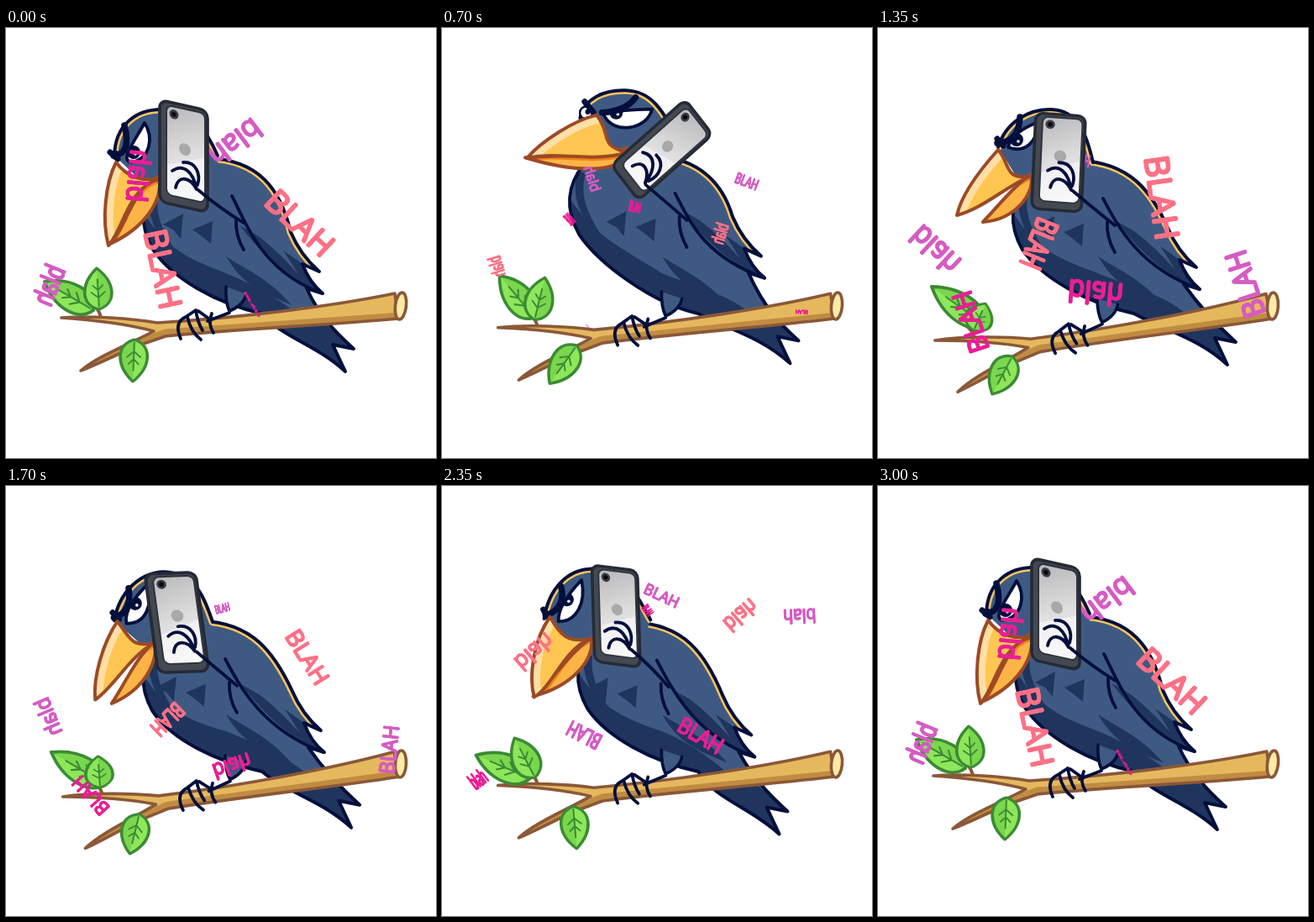
These frames come from a looping animation (512x512 px, 3.05 s). An HTML page with a canvas:

```html
<!DOCTYPE html>
<html lang="en">
<head>
<meta charset="utf-8">
<title>Chatty bird</title>
<style>
html, body { margin: 0; width: 100%; height: 100%; overflow: hidden; background: #fff; }
canvas { display: block; width: 512px; height: 512px; }
</style>
</head>
<body>
<canvas id="stage"></canvas>
<script>
const LOOP = 3050, STEP = 50, CYCLE = 3000;
const TIMES = [0, 450, 950, 1350, 2100, 2650];
const N = TIMES.length;
const INK = '#020f3c', BLUE = '#3f5a82', DARK = '#1f355e', GOLD = '#fdc45c', RUST = '#9c4a26';
const MAGENTA = '#e91f95', ORCHID = '#d65cc3', SALMON = '#fd7186';

const canvas = document.getElementById('stage');
const g = canvas.getContext('2d');
const dpr = window.devicePixelRatio || 1;
canvas.width = canvas.height = 512 * dpr;

// Pose tables: one entry per time, joined by smooth curves.
const keyTime = i => TIMES[(i + N) % N] + CYCLE * Math.floor(i / N);
const NUM = /-?\d+(?:\.\d+)?/g;

function track(...poses) {
  const rows = poses.map(p => p.match(NUM).map(Number));
  const gaps = poses[0].split(NUM);
  const row = i => rows[(i + N) % N];
  const values = t => {
    let i = N - 1;
    while (TIMES[i] > t) i--;
    const t0 = keyTime(i - 1), t1 = keyTime(i), t2 = keyTime(i + 1), t3 = keyTime(i + 2);
    const d = t2 - t1, k = (t - t1) / d;
    return row(i).map((p, j) => {
      const q = row(i + 1)[j];
      const m = (q - row(i - 1)[j]) / (t2 - t0) * d;
      const n = (row(i + 2)[j] - p) / (t3 - t1) * d;
      return p + k * m + k * k * (3 * (q - p) - 2 * m - n) + k * k * k * (2 * (p - q) + m + n);
    });
  };
  const path = t => {
    const v = values(t);
    return gaps.map((s, j) => s + (j < v.length ? v[j].toFixed(2) : '')).join('');
  };
  return { values, path };
}

// Offsets of neck, wing, tail and chest, then the branch drop.
const sway = track('1 -3 -6 5 -12 8 3 0 0', '10 -8 0 -13 -5 0 -10 -22 4', '7 -3 1 -10 1 -2 -5 -10 20',
  '0 0 0 0 0 0 0 0 27', '-13 5 -9 11 -11 12 4 6 19', '-8 2 -11 10 -17 13 -2 -5 2');

const dome = track(
  'M129,152C130,115 155,97 185,97C225,97 240,125 252,152',
  'M168,102C172,80 195,69 220,70C250,71 268,90 290,150',
  'M154,122C160,95 185,83 212,84C240,85 252,100 282,155',
  'M143,142C152,112 180,96 206,97C238,98 248,125 256,160',
  'M117,172C120,135 140,106 172,104C215,105 225,135 242,162',
  'M131,137C140,103 165,90 192,91C230,92 245,125 258,155');

const upperBeak = track(
  'M131,160C118,185 114,230 122,259C140,240 145,190 182,180C160,182 145,178 131,160',
  'M192,99C165,104 125,122 106,138C145,133 175,150 226,146C190,132 210,122 192,99',
  'M165,120C140,132 110,165 98,192C140,180 165,178 206,158C172,155 185,145 165,120',
  'M143,145C125,165 100,195 94,223C125,215 150,190 182,176C150,182 158,162 143,145',
  'M126,170C108,200 108,250 118,276C135,255 145,210 176,192C150,198 140,190 126,170',
  'M134,137C112,160 98,195 99,217C128,215 145,172 180,168C150,172 145,160 134,137');

const lowerBeak = track(
  'M124,257C145,235 150,190 182,176C188,205 165,238 124,257',
  'M106,138C150,136 185,146 226,140C228,170 168,168 106,138',
  'M98,192C140,182 175,172 206,153C208,180 165,196 98,192',
  'M125,231C145,210 160,190 182,174C188,195 165,228 125,231',
  'M119,275C140,245 150,215 176,190C180,218 162,250 119,275',
  'M99,217C125,212 150,180 181,167C186,190 150,222 99,217');

const eye = track(
  'M165,113C176,130 172,155 150,160C135,158 150,140 165,113',
  'M260,98C252,120 210,124 203,97C222,98 240,98 260,98',
  'M223,99C222,125 190,138 172,120C185,108 205,103 223,99',
  'M191,112C190,135 175,150 155,142C158,128 175,118 191,112',
  'M156,116C166,145 160,175 135,178C128,160 145,135 156,116',
  'M182,107C182,128 165,142 147,137C152,122 168,112 182,107');

const pupil = track('152 148', '219 98', '184 113', '165 133', '146 142', '155 128');
const farEye = track('130 149 1', '177 96 8', '158 116 3', '145 138 1', '118 168 1', '133 132 1');
const brow = track('M128,152Q150,150 141,116', 'M205,95Q224,100 243,82', 'M163,117Q200,108 200,90',
  'M142,137Q168,136 169,106', 'M119,170Q140,158 130,132', 'M134,131Q162,126 160,101');
const farBrow = track('M124,148L133,156', 'M174,82L190,94', 'M157,106L161,118',
  'M142,132L149,140', 'M115,162L122,171', 'M131,126L134,134');

// Phone corners: top left, top right, bottom left.
const phone = track('184 87 239 99 184 206', '291 83 324 122 208 156', '263 92 299 126 193 182',
  '189 102 246 106 184 214', '161 105 216 104 182 220', '205 82 255 99 184 193');
const wrist = track('229 193', '247 180', '235 195', '232 194', '223 200', '230 188');

// Leaves: base and tip.
const leaves = [
  track('104 336 46 302', '110 338 66 292', '112 352 68 300', '128 354 64 308', '106 354 43 324', '106 339 41 312'),
  track('111 335 108 286', '108 340 122 291', '113 355 122 306', '114 360 128 328', '110 354 88 308', '112 338 92 291'),
  track('153 371 151 421', '160 374 129 419', '160 383 131 429', '160 391 136 436', '157 387 159 437', '155 374 158 424')
];

const asPath = d => new Path2D(d);
function fill(p, color) { g.fillStyle = color; g.fill(p); }
function line(p, width, color = INK) { g.lineWidth = width; g.strokeStyle = color; g.stroke(p); }
function within(p, draw) { g.save(); g.clip(p); draw(); g.restore(); }
function dot(x, y, r, color) {
  g.beginPath();
  g.arc(x, y, Math.max(0, r), 0, 7);
  g.fillStyle = color;
  g.fill();
}
function box(x, y, w, h, r) {
  const p = new Path2D();
  p.roundRect(x, y, w, h, r);
  return p;
}

// Words: text, colour, x, y, angle, size, x scale, y scale.
const words = [];
function say(key, ...list) {
  for (const w of list) words.push({ key, w });
}
const UP = 'BLAH', LOW = 'blah';
say(0,
  [LOW, MAGENTA, 158, 176, -85, 34, .9, -1], [LOW, ORCHID, 273, 136, 143, 34, 1, 1],
  [UP, SALMON, 350, 232, 43, 38, 1, 1], [UP, SALMON, 187, 287, 78, 38, 1, 1],
  [LOW, ORCHID, 51, 306, 112, 34, .7, -1], [UP, MAGENTA, 293, 329, 59, 36, .38, .06]);
say(1,
  [UP, MAGENTA, 327, 126, 84, 38, 1, 1], [LOW, ORCHID, 378, 144, 185, 36, 1, 1],
  [LOW, SALMON, 174, 170, 225, 36, .95, -1], [UP, ORCHID, 176, 245, 86, 37, .78, 1.1],
  [LOW, MAGENTA, 53, 293, 90, 38, .64, -1.1], [UP, SALMON, 186, 387, 160, 12, 1, 1],
  [LOW, SALMON, 302, 163, -50, 32, .6, -1], [LOW, SALMON, 388, 371, 25, 15, .3, 1]);
say(2,
  [LOW, ORCHID, 168, 169, 235, 34, .9, -1], [UP, MAGENTA, 141, 238, -25, 42, .14, 1],
  [UP, MAGENTA, 243, 220, -5, 36, .32, 1], [UP, ORCHID, 378, 182, 38, 36, .62, 1],
  [LOW, SALMON, 345, 250, 90, 38, .64, -1.1], [LOW, SALMON, 53, 293, 90, 38, .64, -1.1],
  [UP, MAGENTA, 441, 346, 165, 13, .9, 1], [UP, ORCHID, 172, 370, 70, 14, .3, .15]);
say(3,
  [UP, SALMON, 338, 202, 82, 40, 1, 1], [UP, SALMON, 192, 257, 112, 38, .64, 1],
  [LOW, MAGENTA, 259, 315, 5, 36, .9, -1], [LOW, ORCHID, 68, 264, 43, 36, .9, -1],
  [UP, MAGENTA, 110, 350, -108, 33, .9, 1], [UP, ORCHID, 437, 305, -108, 36, .9, 1],
  [UP, ORCHID, 240, 157, 10, 20, .5, 1]);
say(4,
  [UP, ORCHID, 250, 140, 8, 26, .95, 1], [UP, MAGENTA, 233, 157, 70, 18, .4, 1],
  [LOW, SALMON, 341, 157, -58, 36, .85, -1], [LOW, ORCHID, 411, 157, 195, 32, .85, 1],
  [LOW, SALMON, 125, 196, -58, 38, .95, -1], [UP, MAGENTA, 297, 287, 48, 38, .85, 1],
  [UP, ORCHID, 172, 282, 190, 37, .64, 1], [LOW, MAGENTA, 53, 338, -20, 36, .38, 1]);
say(5,
  [UP, SALMON, 273, 157, 132, 32, .95, 1], [UP, SALMON, 205, 218, -25, 30, .75, 1],
  [LOW, MAGENTA, 272, 227, 42, 36, .95, -1], [UP, ORCHID, 411, 240, -126, 36, .92, 1],
  [LOW, ORCHID, 109, 210, -40, 36, .85, -1], [UP, MAGENTA, 119, 291, 45, 46, .3, 1],
  [LOW, SALMON, 463, 302, 0, 26, .5, 1], [LOW, SALMON, 52, 356, 0, 26, .33, 1]);

// A round pen: the word is inked around a small circle, so its line keeps its weight when flipped.
function ink(text, x, y, turn, size, sx, sy) {
  const pen = size * .03;
  g.font = `400 ${size}px "Open Sans", "Noto Sans", sans-serif`;
  for (let a = 0; a < 8; a++) {
    g.save();
    g.translate(x + pen * Math.cos(a * Math.PI / 4), y + pen * Math.sin(a * Math.PI / 4));
    g.rotate(turn);
    g.scale(sx, sy);
    g.fillText(text, 0, size * .36);
    g.restore();
  }
}

function drawWords(t) {
  g.textAlign = 'center';
  g.textBaseline = 'alphabetic';
  words.forEach(({ key, w }, n) => {
    let age = t - TIMES[key];
    if (age > CYCLE / 2) age -= CYCLE;
    if (age < -CYCLE / 2) age += CYCLE;
    const near = age < 0 ? keyTime(key) - keyTime(key - 1) + (key ? 0 : CYCLE) * 0 : keyTime(key + 1) - keyTime(key);
    const left = Math.abs(near) / 2 - Math.abs(age);
    if (left < 0 || (left === 0 && age > 0)) return;
    const [text, color, x, y, angle, size, sx, sy] = w;
    const out = Math.atan2(y - 190, x - 190);
    const grow = Math.min(1, .5 + left / 120);
    const turn = angle * Math.PI / 180 + age * .0012 * (n % 2 ? 1 : -1);
    g.fillStyle = color;
    ink(text, x + Math.cos(out) * age * .06, y + Math.sin(out) * age * .06, turn, size * grow, sx, sy);
  });
}

function drawLeaf(t, leaf) {
  const [x, y, tx, ty] = leaf.values(t);
  const len = Math.hypot(tx - x, ty - y);
  g.save();
  g.translate(x, y);
  g.rotate(Math.atan2(ty - y, tx - x));
  g.scale(len / 60, 1);
  const shape = asPath('M0,0C8,-22 38,-21 60,0C38,21 8,22 0,0Z');
  fill(shape, '#8ee65a');
  within(shape, () => fill(asPath('M0,0L60,0L60,30L0,30Z'), '#7ad64c'));
  line(shape, 3.6, '#3b8a35');
  line(asPath('M4,0L44,0M17,0L25,-8M17,0L25,8M28,0L35,-6M28,0L35,6'), 2, '#3b8a35');
  g.restore();
}

function onBranch(drop, draw) {
  g.save();
  g.translate(470, 331);
  g.rotate(-drop / 404);
  g.translate(-470, -331);
  draw();
  g.restore();
}

function drawBranch() {
  line(asPath('M113,344Q110,334 104,330'), 4, '#8a5838');
  const wood = asPath('M66,345C100,342 150,346 180,351C280,345 390,331 463,316L467,346C380,354 280,358 190,367L152,380' +
    'C130,390 105,402 89,408C110,390 150,375 176,361C150,354 110,348 66,345Z');
  fill(wood, '#e6b85e');
  within(wood, () => line(asPath('M80,411L160,376L190,365C280,358 380,352 470,345'), 13, '#c08c42'));
  line(wood, 3.6, '#8a5838');
  const end = new Path2D();
  end.ellipse(470, 331, 6.5, 16, .12, 0, 7);
  fill(end, '#fdeaa6');
  line(end, 3.6, '#8a5838');
}

function drawFeet() {
  line(asPath('M266,339L240,349M226,336L214,344C205,348 202,356 208,370M216,344Q220,362 232,371' +
    'M226,336Q228,350 234,360M245,340Q240,352 247,363M229,337L243,347'), 3.8);
}

function drawBody(t) {
  const o = sway.values(t);
  const shift = i => (x, y) => `${(x + o[i]).toFixed(2)},${(y + o[i + 1]).toFixed(2)} `;
  const n = shift(0), w = shift(2), b = shift(4), c = shift(6);
  const back = `M${n(240, 158)}C${n(300, 160)}${n(326, 195)}${w(345, 238)}C${w(353, 257)}${w(364, 272)}${w(379, 285)}`;
  const body = asPath(back + `L${w(359, 276)}C${w(364, 290)}${w(372, 302)}${w(383, 311)}L${w(364, 305)}` +
    `C${b(385, 335)}${b(405, 355)}${b(426, 374)}L${b(401, 369)}L${b(416, 401)}` +
    `C${b(380, 368)}${b(340, 360)}305,340 C250,328 ${c(195, 298)}${c(172, 264)}` +
    `C${c(154, 232)}${c(158, 205)}${c(178, 180)}L${n(178, 165)}Z`);
  fill(body, BLUE);
  within(body, () => {
    fill(asPath(`M${c(150, 200)}C${c(180, 262)}${c(215, 275)}262,292 C300,308 ${b(345, 318)}${b(372, 345)}` +
      `L${b(386, 340)}L${b(430, 374)}L${b(416, 405)}L280,350L${c(150, 300)}Z`), DARK);
    fill(asPath('M262,272C290,290 315,300 340,330C315,318 285,312 262,272Z'), DARK);
    fill(asPath(`M${c(170, 190)}C${c(160, 225)}${c(180, 255)}${c(205, 275)}C${c(182, 240)}${c(172, 220)}${c(180, 190)}Z`), DARK);
    fill(asPath(`M${n(186, 237)}L${n(210, 224)}L${n(207, 254)}L${n(198, 243)}Z` +
      `M${n(221, 243)}L${n(245, 233)}L${n(243, 260)}L${n(232, 251)}Z`), DARK);
    fill(asPath(`M${w(284, 230)}C${w(310, 245)}${w(335, 258)}${w(359, 276)}L${w(383, 311)}C${w(345, 296)}${w(315, 270)}${w(284, 230)}Z`), DARK);
    fill(asPath(`M${w(284, 226)}C${w(320, 252)}${w(330, 262)}${w(354, 288)}C${w(326, 240)}${w(300, 215)}${w(284, 226)}Z`), BLUE);
    line(asPath(back), 9, GOLD);
  });
  line(body, 4);
  line(asPath(`M${n(268, 203)}C${n(285, 235)}${w(310, 285)}${w(383, 311)}`), 3.8);
  const thigh = asPath('M262,308Q261,326 266,337Q283,330 286,317');
  onBranch(o[8], () => { fill(thigh, BLUE); line(thigh, 3.6); });
  return { drop: o[8], n, c };
}

function drawHead(t, { n, c }) {
  const arc = dome.path(t), curve = asPath(arc);
  const skull = asPath(`${arc}L${n(250, 185)}L${n(225, 210)}L${c(182, 205)}Z`);
  fill(skull, BLUE);
  within(skull, () => line(curve, 9, GOLD));
  line(curve, 4);

  const [fx, fy, fr] = farEye.values(t);
  dot(fx, fy, fr + 2.5, INK);
  dot(fx, fy, fr, '#fff');
  dot(fx + 2, fy - 1, fr * .5, INK);

  const lid = asPath(eye.path(t) + 'Z');
  const [px, py] = pupil.values(t);
  fill(lid, '#fff');
  within(lid, () => { dot(px, py, 8, INK); dot(px + 2, py + 2, 1.8, '#fff'); });
  line(lid, 3.8);
  line(asPath(brow.path(t)), 7.5);
  line(asPath(farBrow.path(t)), 7);

  const low = asPath(lowerBeak.path(t) + 'Z');
  const top = upperBeak.path(t), high = asPath(top + 'Z');
  fill(low, '#fdb446');
  within(low, () => line(high, 9, '#ee8418'));
  line(low, 4, RUST);
  fill(high, '#ffc651');
  within(high, () => line(asPath(top.split('C').slice(0, 2).join('C')), 20, '#ffdfa6'));
  line(high, 4, RUST);
}

function drawPhone(t) {
  const [x, y, rx, ry, bx, by] = phone.values(t);
  g.save();
  g.transform((rx - x) / 55, (ry - y) / 55, (bx - x) / 116, (by - y) / 116, x, y);
  const shell = box(-1, -1, 57, 118, 9), face = box(7, 3, 46, 104, 7);
  fill(shell, '#444851');
  line(shell, 3.6, '#252a36');
  const shade = g.createLinearGradient(8, 4, 50, 108);
  shade.addColorStop(0, '#b9b9bb');
  shade.addColorStop(.5, '#dededf');
  shade.addColorStop(1, '#f6f6f6');
  fill(face, shade);
  within(face, () => fill(asPath('M0,75L60,52L60,120L0,120Z'), 'rgba(255,255,255,.5)'));
  line(face, 2, '#30343e');
  dot(16, 12, 5.5, '#3a3d46');
  dot(16, 12, 2.8, '#08090d');
  dot(29, 50, 7, '#a9a9ab');
  g.restore();
  return Math.atan2(x - bx, by - y);
}

function drawHand(t, tilt, { n }) {
  const [x, y] = wrist.values(t);
  g.save();
  g.translate(x, y);
  g.rotate(tilt);
  line(asPath('M-31,-23C-18,-32 -6,-22 -2,-1M-18,-33C-2,-34 3,-18 -1,-6M-27,-3C-24,-18 -10,-16 -2,-1'), 3.8);
  g.restore();
  line(asPath(`M${x},${y}Q${x + 26},${y + 22} ${n(282, 235)}M${n(273, 231)}Q${n(272, 250)}${n(282, 267)}`), 3.8);
}

function draw(t) {
  g.setTransform(dpr, 0, 0, dpr, 0, 0);
  g.fillStyle = '#fff';
  g.fillRect(0, 0, 512, 512);
  g.lineCap = g.lineJoin = 'round';
  const bird = drawBody(t);
  drawHead(t, bird);
  onBranch(bird.drop, drawBranch);
  leaves.forEach(leaf => drawLeaf(t, leaf));
  onBranch(bird.drop, drawFeet);
  drawWords(t);
  const tilt = drawPhone(t);
  drawHand(t, tilt, bird);
}

const start = performance.now();
function tick() {
  const t = (performance.now() - start) % LOOP;
  draw(Math.floor(t / STEP) * STEP % CYCLE);
  requestAnimationFrame(tick);
}
tick();
</script>
</body>
</html>
```
